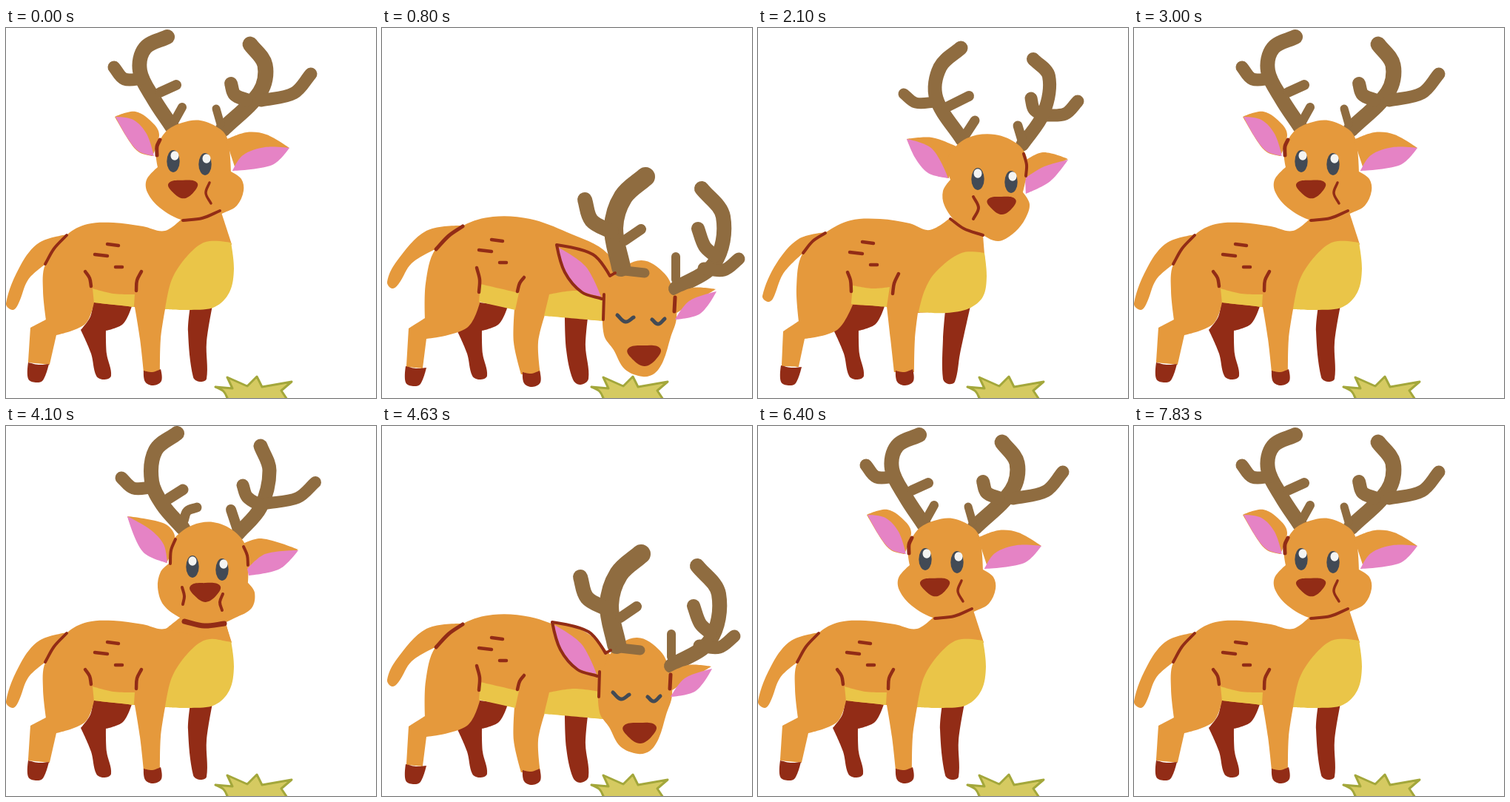
Write an HTML page with a canvas that moves like this. It is 500 px wide and 500 px high and loops after 7910 ms.

```html
<!DOCTYPE html>
<html lang="en">
<head>
<meta charset="utf-8">
<title>Grazing deer</title>
<style>
html, body { margin: 0; width: 100%; height: 100%; overflow: hidden; background: #fff; }
canvas { display: block; }
</style>
</head>
<body>
<canvas id="stage" width="500" height="500"></canvas>
<script>
const ctx = document.getElementById('stage').getContext('2d');
const coat = '#e5993c', horn = '#8f6c40', rust = '#922c16', gold = '#eac548';
const pink = '#e583c5', slate = '#424a55', leaf = '#d5ca61', stem = '#a3a73b';

// Smooth curve through "x,y" points; a trailing ! makes a sharp corner.
function trace(text, closed) {
  const pts = text.split(' ').map(s => {
    const [x, y] = s.split(',').map(parseFloat);
    return { x, y, sharp: s.endsWith('!') };
  });
  const n = pts.length;
  const get = i => closed ? pts[(i + n) % n] : pts[Math.max(0, Math.min(n - 1, i))];
  const handle = (i, size) => {
    const p = get(i), a = get(i - 1), b = get(i + 1);
    const k = p.sharp ? 0 : size / (Math.hypot(b.x - a.x, b.y - a.y) || 1);
    return [p.x + (b.x - a.x) * k, p.y + (b.y - a.y) * k];
  };
  ctx.beginPath();
  ctx.moveTo(pts[0].x, pts[0].y);
  for (let i = 0; i < (closed ? n : n - 1); i++) {
    const p = get(i), q = get(i + 1);
    const size = Math.hypot(q.x - p.x, q.y - p.y) / 3;
    ctx.bezierCurveTo(...handle(i, size), ...handle(i + 1, -size), q.x, q.y);
  }
  if (closed) ctx.closePath();
}

function fill(color, text) {
  trace(text, true);
  ctx.fillStyle = color;
  ctx.fill();
}

function line(color, width, text) {
  trace(text, false);
  ctx.strokeStyle = color;
  ctx.lineWidth = width;
  ctx.stroke();
}

function oval(color, x, y, rx, ry) {
  ctx.beginPath();
  ctx.ellipse(x, y, rx, ry, 0, 0, 2 * Math.PI);
  ctx.fillStyle = color;
  ctx.fill();
}

function shifted(x, y, scale, paint) {
  ctx.save();
  ctx.translate(x, y);
  ctx.scale(scale, scale);
  paint();
  ctx.restore();
}

function eye(x, y, lookX) {
  oval(slate, x, y, 8.7, 15);
  oval('#f4f4f2', x + lookX, y - 7.5, 5.5, 6.2);
}

const nose = (x, y, scale) => shifted(x, y, scale, () =>
  fill(rust, '-22,-9 0,-14 22,-10 16,5 1,14 -14,6'));

const hindLeg = x => shifted(x, 0, 1, () =>
  fill(rust, '118,369! 170,376! 158,400 135,409! 136,440 142,470 132,475 122,470 115,440 101,408! 114,390'));

const hooves = (x, y, frontX, frontY) => {
  shifted(x, y, 1, () => fill(rust, '30,452! 44,455 58,454! 50,476 40,479 30,474'));
  shifted(frontX, frontY, 1, () => fill(rust, '186,463! 198,465 209,461! 210,477 199,483 188,478'));
};

const marks = (x, y) => shifted(x, y, 1, () => {
  line(rust, 4.5, '137,292 152,294');
  line(rust, 4.5, '120,306 137,308');
  line(rust, 4.5, '148,323 157,323');
});

const bodies = {
  left() {
    hindLeg(0);
    fill(rust, '249,376! 279,375! 271,425 271,474 262,478 253,472 246,410');
    fill(coat, '83,279! 45,290 20,320 0,372 9,381 17,372 30,340 52,320!');
    fill(coat, '83,279 110,265 145,263 185,268 215,274 240,255! 290,246! 305,292! 255,378! 215,380! 209,420 208,465! 186,465! 181,420 174,377! 119,371! 107,400 68,415! 59,455! 30,452! 33,405! 54,394! 50,355 53,320');
    fill(gold, '304,290! 270,289 245,308 224,340 215,380! 250,381 282,377 302,357 308,325');
    fill(gold, '117,352! 145,359 174,360! 173,377! 119,371!');
    hooves(0, 0, 0, 0);
    marks(0, 0);
    line(rust, 4, '82,280 65,298 53,319');
    line(rust, 4.5, '107,329 113,338 115,349');
    line(rust, 4.5, '183,329 177,341 176,355');
  },
  right() {
    hindLeg(1);
    fill(rust, '253,382! 287,376! 273,440 266,478 257,481 250,474 250,420');
    fill(coat, '92,276! 55,285 25,318 6,362 13,370 20,366 34,332 60,305!');
    fill(coat, '92,276 125,260 165,258 205,264 232,273 260,256! 304,280! 308,330! 255,383! 216,385! 212,420 211,465! 184,465! 179,420 174,376! 128,374! 107,408 63,420! 55,458! 32,457! 34,410! 55,396! 52,350 60,305');
    fill(gold, '306,304! 275,304 240,330 225,355 217,384! 255,385 285,379 304,363 309,335');
    fill(gold, '128,348! 155,352 178,350! 174,377! 126,373!');
    hooves(1, 4, 0, 0);
    marks(4, -3);
    line(rust, 4, '91,277 74,288 61,304');
    line(rust, 4.5, '121,330 125,341 126,356');
    line(rust, 4.5, '190,332 184,345 182,359');
  },
  low() {
    hindLeg(0);
    fill(rust, '247,387! 278,392! 275,430 279,474 268,482 258,475 249,435');
    fill(coat, '110,267! 60,274 20,315 7,343 14,352 23,345 40,318 72,299!');
    fill(coat, '110,267 150,255 200,258 250,276 305,305 330,360! 300,396! 220,388! 211,425 214,468! 188,468! 178,425 179,380! 133,368! 115,405 60,420! 55,460! 33,458! 36,406! 58,392! 59,345 72,299');
    fill(gold, '133,346! 185,358! 180,381! 131,370!');
    fill(gold, '226,360! 260,355 300,360! 300,396! 219,389!');
    hooves(2, 5, 4, 2);
    marks(11, -6);
    line(rust, 5, '109,268 90,281 73,299');
    line(rust, 4.5, '128,324 132,340 131,357');
    line(rust, 4.5, '192,337 186,345 183,356');
  }
};

const heads = {
  left() {
    line(horn, 20, '218,12 188,27 181,58 199,95 224,133');
    line(horn, 17, '146,53 160,69 185,68');
    line(horn, 14, '230,77 208,87');
    line(horn, 12, '238,107 228,125');
    line(horn, 21, '330,22 350,50 343,87 293,137');
    line(horn, 17, '412,62 389,88 345,98');
    line(horn, 18, '304,75 309,90 325,97');
    line(horn, 11, '284,109 290,130');
    fill(coat, '147,120! 175,113 200,130 207,145 198,173! 180,168 168,155');
    fill(pink, '148,120! 172,124 190,143 200,173! 180,167 165,150');
    fill(coat, '216,140 238,128 263,125 290,137 300,152 304,194! 318,204 321,220 312,240 296,249 270,258 240,260 208,243 191,222 190,205 205,188! 203,165');
    fill(coat, '297,151! 325,141 352,144 383,162! 310,190!');
    fill(pink, '306,193! 320,172 350,161 383,162! 360,185');
    line(rust, 5, '208,151 204,160 204,172');
    eye(226, 180, 2);
    eye(269, 184, 2);
    nose(239, 218, .88);
    line(rust, 3.5, '275,209 270,223 277,237');
    line(rust, 4, '239,260 265,257 289,247');
  },
  front() {
    fill(coat, '215,275! 240,255! 296,262! 304,292!');
    line(horn, 20, '231,10 202,33 197,75 212,107 239,138');
    line(horn, 17, '156,70 172,84 197,83');
    line(horn, 15, '239,86 220,98');
    line(horn, 13, '258,110 245,115 240,128');
    line(horn, 19, '344,27 356,60 344,110 313,146');
    line(horn, 16, '418,76 394,97 350,105');
    line(horn, 17, '320,80 326,96 345,108');
    line(horn, 14, '304,113 313,140');
    fill(coat, '164,122! 212,131 227,145 226,165 217,185! 185,165');
    fill(pink, '164,122! 195,140 213,160 218,185! 185,170');
    fill(coat, '229,150 252,134 280,130 308,142 325,165 327,212! 336,225 332,246 310,259 285,269 260,268 237,260 213,242 205,218 209,197 220,186! 221,166');
    fill(coat, '318,160! 345,152 395,167! 326,195!');
    fill(pink, '395,168! 350,173 326,193! 328,202! 370,193');
    line(rust, 4, '229,153 223,168 222,186');
    line(rust, 4, '321,163 326,175 327,188');
    eye(252, 190, 0);
    eye(292, 194, 2);
    nose(269, 225, .92);
    line(rust, 4, '238,218 241,230 239,241');
    line(rust, 4, '293,227 289,238 292,249');
    line(rust, 7, '241,264 268,270 295,267');
  },
  right() {
    line(horn, 19, '274,27 246,53 241,95 276,151');
    line(horn, 15, '197,89 213,101 240,100');
    line(horn, 14, '285,92 255,107');
    line(horn, 13, '293,125 280,145');
    line(horn, 18, '372,42 393,65 386,115 357,158');
    line(horn, 17, '432,99 415,116 385,118');
    line(horn, 17, '369,95 373,110 385,118');
    line(horn, 13, '351,132 357,152');
    fill(coat, '201,150! 235,148 268,160! 258,203! 225,190');
    fill(pink, '201,150! 235,163 257,203! 230,196 212,175');
    fill(coat, '360,180! 385,168 419,177! 365,205!');
    fill(pink, '419,178! 385,188 361,203! 362,224! 395,207');
    fill(coat, '258,172 282,149 320,144 352,158 364,180 358,222! 367,238 361,258 348,275 330,287 318,287 302,279 270,264 252,240 250,220 260,205! 256,190');
    line(rust, 4, '359,170 363,185 362,200');
    eye(297, 204, 0);
    eye(342, 208, 2);
    nose(329, 240, .86);
    line(rust, 4, '291,228 298,243 291,258');
    line(rust, 4, '260,258 278,271 304,280');
  },
  low() {
    fill(coat, '300,375 316,334 350,314 382,332 395,360 398,392 390,418 380,450 368,467 352,471 328,461 313,435 300,415');
    line(horn, 26, '356,201 326,228 313,270 323,323');
    line(horn, 20, '274,232 283,260 310,275');
    line(horn, 14, '350,272 328,287');
    line(horn, 13, '355,331 328,328');
    line(horn, 20, '432,217 461,255 449,318 397,352');
    line(horn, 18, '427,271 436,295 450,308');
    line(horn, 17, '482,312 462,327 435,325');
    line(horn, 12, '397,309 397,340');
    fill(coat, '234,292! 275,303 310,335 298,365! 265,354 243,325');
    fill(pink, '239,297! 275,322 296,363! 262,352 245,328');
    line(rust, 4, '315,331 308,335! 285,306 236,293! 247,330 270,357 297,366');
    line(rust, 4, '300,360 299,394');
    fill(coat, '393,362! 420,351 451,353! 398,385!');
    fill(pink, '452,356! 415,369 396,394! 430,386');
    line(rust, 5, '396,364 395,383');
    line(slate, 5, '318,388 329,397 340,391');
    line(slate, 5, '365,394 373,400 382,393');
    nose(354, 443, 1);
  },
  graze() {
    fill(coat, '297,400 312,366 345,350 375,360 388,385 388,410 382,425 375,460 350,480 315,468 300,445 294,420');
    line(horn, 26, '345,233 319,262 319,308 332,348');
    line(horn, 18, '275,263 287,290 312,302');
    line(horn, 15, '353,302 328,314');
    line(horn, 14, '352,344 335,350');
    line(horn, 20, '434,251 457,277 443,333 393,369');
    line(horn, 17, '421,311 438,338');
    line(horn, 16, '474,334 452,346 425,345');
    line(horn, 12, '391,347 389,370');
    fill(coat, '236,330! 275,332 303,358 292,388! 260,370');
    fill(pink, '238,334! 275,343 294,382! 258,367');
    line(rust, 4, '312,353 305,362! 280,337 236,329! 262,370 293,386! 292,404');
    fill(coat, '388,382! 420,372 451,374! 398,405!');
    fill(pink, '451,382! 415,389 390,404! 392,413! 430,405');
    line(rust, 6, '392,386 393,403');
    line(slate, 5, '316,415 328,427 342,420');
    line(slate, 5, '365,422 373,430 382,420');
    nose(354, 461, .97);
  }
};

function grass() {
  const blades = '300,502 294,491 283,485! 306,487! 299,472! 326,484! 339,471! 346,485! 386,478! 372,490! 380,502!';
  fill(leaf, blades);
  line(stem, 3, blades);
}

// Body, head, head offset
const poses = {
  A: ['left', 'left', 0, 0],
  D: ['left', 'front', 0, 0],
  C: ['right', 'right', 0, 0],
  I: ['right', 'low', -17, -125],
  R: ['low', 'low', -6, -28],
  B: ['low', 'low', 0, 0],
  M: ['low', 'graze', 2, -15],
  E: ['low', 'graze', 0, 0]
};
const cycle = 'ADCCIIRBMEEMBMEEMRICCD'.padEnd(36, 'A');
const loop = 7910, block = 1100, lead = 630;
const starts = [0, 100, 200, 330, 430, 530, 630, 760, 860, 960];

function step(time) {
  const t = time % loop + lead;
  const inBlock = starts.filter(s => s <= t % block).length - 1;
  return Math.floor(t / block) * 10 + inBlock - 6;
}

function draw() {
  const [body, head, x, y] = poses[cycle[step(performance.now()) % cycle.length]];
  ctx.fillStyle = '#fff';
  ctx.fillRect(0, 0, 500, 500);
  ctx.lineCap = ctx.lineJoin = 'round';
  bodies[body]();
  shifted(x, y, 1, heads[head]);
  grass();
  requestAnimationFrame(draw);
}
draw();
</script>
</body>
</html>
```
